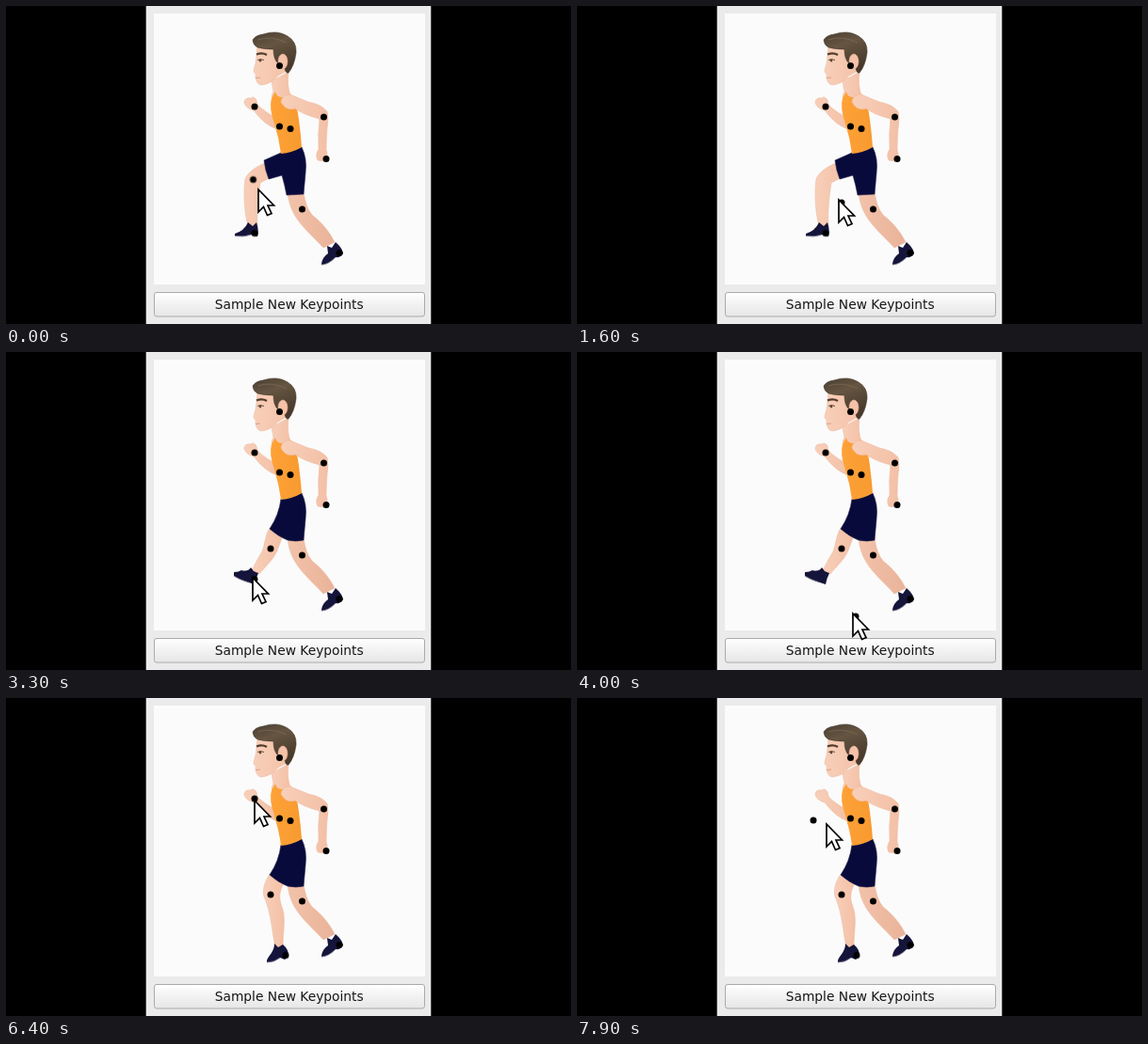
An HTML page for the animation above (8 s loop, 600 by 338 pixels).

```html
<!DOCTYPE html>
<html lang="en">
<head>
<meta charset="utf-8">
<title>Keypoint editor</title>
<style>
  html, body { margin: 0; width: 100%; height: 100%; overflow: hidden; background: #000; }
  svg { display: block; width: 100vw; height: 100vh; }
  .label { font: 13.8px "DejaVu Sans", sans-serif; fill: #161616; text-anchor: middle; }
  .skin { fill: url(#skin); stroke: #efbda3; stroke-width: .6; stroke-linejoin: round; }
  .rear { fill: url(#shade); }
  .shoe { fill: #15143a; }
  .sole { fill: none; stroke: #77758c; stroke-width: .9; }
  .shorts { fill: #080a3b; stroke: #20204c; stroke-width: .6; stroke-linejoin: round; }

  /* One loop is 8 s, so 1.25% is one 100 ms tick; steps() counts ticks. */
  .pose, .move { animation: 8s step-end infinite; }
  .raised { animation-name: raised; }
  .back { animation-name: back; }
  .planted { animation-name: planted; }
  .lowered { animation-name: lowered; }
  .knee { animation-name: knee; }
  .foot { animation-name: foot; }
  .hand { animation-name: hand; }
  .cursor { animation-name: cursor; }

  @keyframes raised { 0% { visibility: visible; } 32.5%, 100% { visibility: hidden; } }
  @keyframes lowered { 0% { visibility: hidden; } 32.5%, 100% { visibility: visible; } }
  @keyframes back { 0% { visibility: hidden; } 32.5% { visibility: visible; } 70%, 100% { visibility: hidden; } }
  @keyframes planted { 0% { visibility: hidden; } 70%, 100% { visibility: visible; } }

  @keyframes knee {
    0% { transform: translate(262.5px, 184.5px); }
    5% { transform: translate(262.5px, 184.5px); animation-timing-function: steps(5); }
    11.25% { transform: translate(278px, 206px); animation-timing-function: steps(2); }
    13.75%, 100% { transform: translate(281px, 209px); }
  }
  @keyframes foot {
    0% { transform: translate(264px, 241.5px); }
    42.5% { transform: translate(264px, 241.5px); animation-timing-function: steps(6); }
    50% { transform: translate(296px, 281px); animation-timing-function: steps(3); }
    53.75% { transform: translate(297px, 275px); animation-timing-function: steps(2); }
    56.25%, 100% { transform: translate(297px, 273.5px); }
  }
  @keyframes hand {
    0% { transform: translate(264px, 107px); }
    81.25% { transform: translate(264px, 107px); animation-timing-function: steps(8); }
    91.25%, 100% { transform: translate(251px, 130px); }
  }
  @keyframes cursor {
    0% { transform: translate(268px, 195px); animation-timing-function: steps(3); }
    3.75% { transform: translate(260px, 182px); }
    5% { transform: translate(260px, 182px); animation-timing-function: steps(5); }
    11.25% { transform: translate(275px, 203px); animation-timing-function: steps(2); }
    13.75% { transform: translate(278px, 206px); }
    20% { transform: translate(278px, 206px); animation-timing-function: steps(4); }
    25% { transform: translate(282px, 228px); }
    26.25% { transform: translate(282px, 228px); animation-timing-function: steps(2); }
    28.75% { transform: translate(283px, 238px); }
    31.25% { transform: translate(283px, 238px); animation-timing-function: steps(8); }
    41.25% { transform: translate(262px, 240px); }
    42.5% { transform: translate(262px, 240px); animation-timing-function: steps(6); }
    50% { transform: translate(293px, 278px); animation-timing-function: steps(3); }
    53.75% { transform: translate(294px, 272px); animation-timing-function: steps(2); }
    56.25% { transform: translate(294px, 270px); }
    58.75% { transform: translate(294px, 270px); animation-timing-function: steps(3); }
    62.5% { transform: translate(288.5px, 282.5px); }
    68.75% { transform: translate(288.5px, 282.5px); animation-timing-function: steps(9); }
    80% { transform: translate(264px, 109px); }
    81.25% { transform: translate(264px, 109px); animation-timing-function: steps(8); }
    91.25% { transform: translate(248px, 128px); animation-timing-function: steps(6); }
    98.75%, 100% { transform: translate(265px, 134px); }
  }
</style>
</head>
<body>
<svg viewBox="0 0 600 338" preserveAspectRatio="none">
  <defs>
    <linearGradient id="button" x2="0" y2="1">
      <stop offset="0" stop-color="#fff"/>
      <stop offset=".5" stop-color="#f2f2f2"/>
      <stop offset="1" stop-color="#e6e6e6"/>
    </linearGradient>
    <linearGradient id="skin">
      <stop offset="0" stop-color="#f8cfb9"/>
      <stop offset="1" stop-color="#f3c0a6"/>
    </linearGradient>
    <linearGradient id="shade">
      <stop offset="0" stop-color="#f2c2aa"/>
      <stop offset="1" stop-color="#e9b399"/>
    </linearGradient>
    <linearGradient id="shirt">
      <stop offset="0" stop-color="#fea238"/>
      <stop offset="1" stop-color="#f79a30"/>
    </linearGradient>
    <linearGradient id="hair" x2=".4" y2="1">
      <stop offset="0" stop-color="#4a3f33"/>
      <stop offset=".4" stop-color="#655541"/>
      <stop offset="1" stop-color="#48392c"/>
    </linearGradient>
    <filter id="soft"><feGaussianBlur stdDeviation=".6"/></filter>
    <circle id="dot" r="3.5"/>
  </defs>

  <rect width="600" height="338"/>
  <rect x="148.7" width="302.6" height="338" fill="#ebebeb"/>
  <rect x="157" y="8" width="288" height="288" fill="#fbfbfb"/>
  <rect x="157.5" y="304.5" width="287" height="25.5" rx="2.5" fill="url(#button)" stroke="#aaa"/>
  <text class="label" x="300.7" y="322">Sample New Keypoints</text>

  <g filter="url(#soft)">
    <!-- rear leg -->
    <path class="skin rear" d="M299 197C300 209 303 216 307 223C315 236 325 244 337 257L349 251C343 239 335 230 325 222Q318 214 316 197Z"/>
    <path class="shoe" d="M335 274Q336 267 342 263L341 255L346 257L350 251Q357 257 358 263Q355 268 350 267Q342 275 335 275Z"/>
    <path class="sole" d="M335 275Q342 275 350 267"/>

    <!-- front leg -->
    <g class="pose raised">
      <path class="skin" d="M277 166C267 170 257 176 254 184C252 197 253 219 257 234L267 234C266 217 268 201 270 188L283 181Z"/>
      <path class="shoe" d="M243 242Q253 239 257 230L262 234L266 230Q269 239 267 245L260 243Q252 246 243 244Z"/>
      <path class="sole" d="M243 244.5Q252 246 260 243"/>
      <path class="shorts" d="M292 156Q304 155 314 150Q320 162 318 178L316 200L298 201Q296 190 293 180L279 184Q275 174 274 164Z"/>
    </g>
    <g class="pose back">
      <path class="skin" d="M280 187C275 195 275 205 272 212Q266 222 261 232L269 236C275 228 284 221 288 211Q291 203 294 195Z"/>
      <path class="shoe" d="M242 234Q247 234 250 232Q257 234 260 229L263 233L268 235Q265 241 264 247L258 245Q248 242 242 238Z"/>
      <path class="sole" d="M242 238Q248 242 258 245"/>
    </g>
    <g class="pose planted">
      <path class="skin" d="M280 187C275 195 272 203 274 211C281 227 282 243 286 266L294 266C294 249 297 237 294 225C290 214 289 208 295 197Z"/>
      <path class="shoe" d="M277 279C279 273 285 270 285 261L289 265L294 262Q300 267 300 274L296 278L291 276Q285 281 277 281Z"/>
      <path class="sole" d="M277 281Q285 281 291 276"/>
    </g>
    <path class="pose lowered shorts" d="M292 156Q304 155 314 150Q320 162 318 178L316 200Q308 202 299 200Q289 196 280 188Q290 173 292 156Z"/>

    <!-- far arm -->
    <path class="skin" d="M289 120Q277 114 269 107Q266 104 266 100Q263 95 260 98Q253 97 253 103Q255 109 263 111Q275 127 288 131Z"/>

    <!-- neck and torso -->
    <path class="skin" d="M282 80L300 70Q298 84 302 95L300 108L285 106Q280 96 284 91Z"/>
    <path d="M286 91Q287 97 294 97Q300 99 302 93Q309 103 311 121Q313 136 314 150Q304 156 292 157Q290 141 285 125Q279 108 282 98Z" fill="url(#shirt)"/>

    <!-- near arm -->
    <path class="skin" d="M292 102Q293 94 302 94Q311 98 321 102Q334 104 341 112Q343 119 341 130Q340 143 340 153Q343 160 338 165L331 164Q328 158 332 152Q331 136 333 120Q317 116 307 109Q297 112 292 102Z"/>
    <path d="M333 121Q335 116 339 117" fill="none" stroke="#e4ad95" stroke-width=".8"/>

    <!-- head -->
    <path class="skin" d="M267 42Q266 55 265 61Q263 67 263 70Q266 72 265 76Q266 83 271 84Q282 83 289 74L302 67L305 46L284 38Z"/>
    <path d="M262 36Q265 31 273 30Q288 25 299 32Q309 38 308 50Q306 64 300 71Q297 72 296 66Q294 60 289 61Q284 57 284 46Q274 46 267 44Q262 41 262 36Z" fill="url(#hair)" stroke="#493b2e" stroke-width=".6"/>
    <path d="M267 36Q282 31 298 39" fill="none" stroke="#7b6a54" stroke-width=".8"/>
    <ellipse cx="294" cy="59" rx="5" ry="8" fill="#f4c2a8" stroke="#e3ab90" stroke-width=".6"/>
    <path d="M266 51.5Q272 49 277 52" fill="none" stroke="#513d2c" stroke-width="2.2"/>
    <path d="M267 57.5Q270 55.5 274 57.5" fill="none" stroke="#66503f"/>
    <circle cx="270" cy="58" r="1.4" fill="#5b4638"/>
    <path d="M265 76.5L270 76" stroke="#d99a84" stroke-width=".9"/>
  </g>

  <use href="#dot" x="290.5" y="63.5"/>
  <use href="#dot" x="290.5" y="128"/>
  <use href="#dot" x="302" y="130.5"/>
  <use href="#dot" x="337.5" y="118"/>
  <use href="#dot" x="340" y="162.5"/>
  <use href="#dot" x="314.5" y="216"/>
  <use href="#dot" x="354" y="262.5"/>
  <use class="move knee" href="#dot"/>
  <use class="move foot" href="#dot"/>
  <use class="move hand" href="#dot"/>

  <path class="move cursor" d="M0 0V24L5.5 18.5L9.5 27.5L14 25.5L10 17H16.5Z" fill="#fff" stroke="#000" stroke-width="1.7"/>
</svg>
</body>
</html>
```
